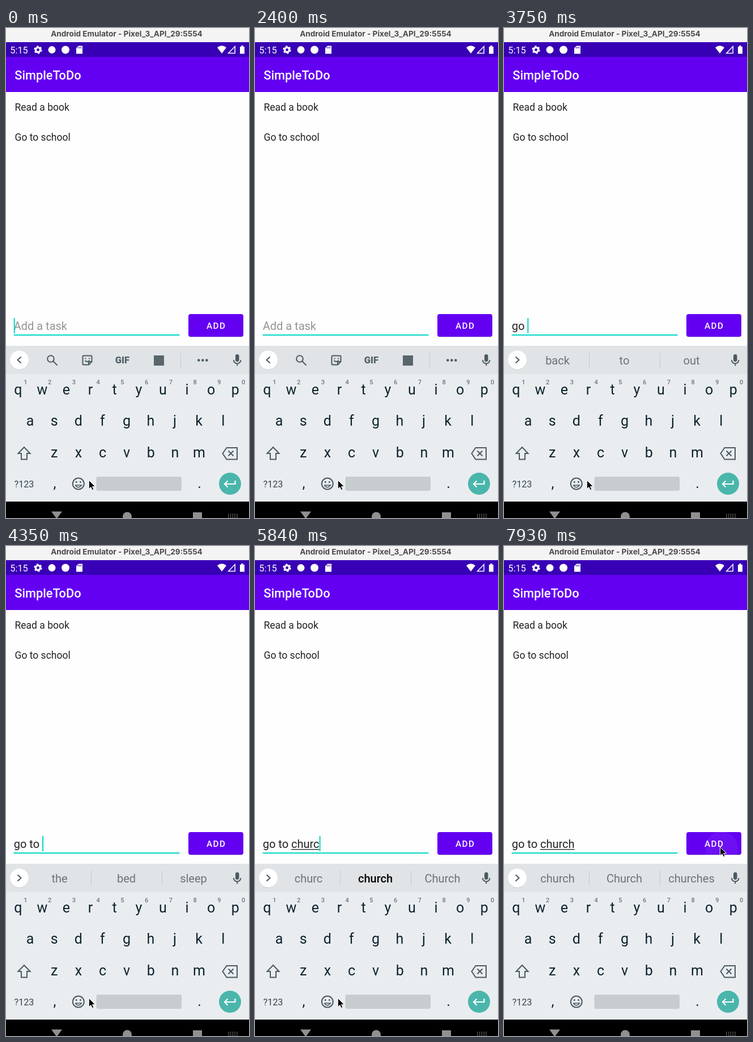
Animation, 429 px wide and 865 px high, one loop 8000 ms. Source, as an HTML page:

```html
<!DOCTYPE html>
<html lang="en">
<head>
<meta charset="utf-8">
<title>SimpleToDo</title>
<style>
  html, body { margin: 0; width: 100%; height: 100%; overflow: hidden; background: #fefefe; }
  svg { display: block; width: 429px; height: 865px; font-family: Roboto, sans-serif; }
  text { white-space: pre; }
  .mid { text-anchor: middle; }
  .line { fill: none; stroke: #4b5a61; stroke-width: 2; }
  .key { font-size: 25px; fill: #0c232c; text-anchor: middle; }
  .digit { font-size: 11px; font-weight: 500; fill: #6d767b; text-anchor: middle; }
  .hint { font-size: 20px; fill: #6b7378; text-anchor: middle; }
  .hint.best { fill: #000; font-weight: 500; }
  .field { font-size: 20px; }
</style>
</head>
<body>
<svg viewBox="0 0 429 865">
  <rect width="429" height="25" fill="#f5f4f5"/>
  <text class="mid" x="213" y="15.300" font-family="Inter, sans-serif" font-size="13.600" font-weight="700" fill="#4b4a4b">Android Emulator - Pixel_3_API_29:5554</text>

  <rect y="25" width="429" height="27" fill="#3800b5"/>
  <rect y="51" width="429" height="62" fill="#6300f2"/>
  <g fill="#fff">
    <text x="7.300" y="44.500" font-size="16.300">5:15</text>
    <circle cx="56.500" cy="38.500" r="4.100" fill="none" stroke="#fff" stroke-width="3.400"/>
    <circle cx="56.500" cy="38.500" r="6.200" fill="none" stroke="#fff" stroke-width="2" stroke-dasharray="3.250"/>
    <circle cx="81" cy="38.500" r="6.500"/>
    <circle cx="105" cy="38.500" r="7"/>
    <path d="M128 31.500h7v14h-11v-10z"/>
    <path d="M127.500 36v-2.500M130 36v-2.500M132.500 36v-2.500" stroke="#3800b5" stroke-width="1.200"/>
    <path d="M373 34.500q8-6.500 16 0l-8 10.500z"/>
    <path d="M404.200 32.500v12h-11.500z" fill="none" stroke="#fff" stroke-width="1.500"/>
    <path d="M413 33h2.300v-2h3.400v2h2.300v12.500h-8z"/>
    <text x="15.300" y="91" font-size="21.800" font-weight="500">SimpleToDo</text>
  </g>

  <g font-size="17.500" fill="#222">
    <text x="15.500" y="146">Read a book</text>
    <text x="15.500" y="199">Go to school</text>
  </g>

  <text class="field" id="prompt" x="13.700" y="533" fill="#949494">Add a task</text>
  <text class="field" id="typed" x="13.700" y="533" fill="#222"></text>
  <rect id="under" y="535" height="1.300" fill="#222"/>
  <rect x="13.500" y="541" width="293" height="2" fill="#03d6c8"/>
  <rect id="caret" y="512" width="2" height="27" fill="#03d6c8"/>

  <clipPath id="edge"><rect x="322" y="505" width="97" height="40" rx="4"/></clipPath>
  <rect x="322" y="506" width="97" height="40" rx="4" fill="#000" opacity=".15"/>
  <rect x="322" y="505" width="97" height="40" rx="4" fill="#6300f2"/>
  <circle id="ripple" cx="384" cy="533" r="29" fill="#fff" opacity=".06" clip-path="url(#edge)"/>
  <text class="mid" x="371.200" y="531" font-size="15.300" font-weight="500" letter-spacing="1.370" fill="#fff">ADD</text>

  <rect y="561" width="429" height="50" fill="#e0e4e7"/>
  <rect y="611" width="429" height="225" fill="#eaedf0"/>
  <circle cx="23.500" cy="586.700" r="16.800" fill="#000" opacity=".08"/>
  <circle cx="23.500" cy="586" r="16.500" fill="#fff"/>
  <path id="chevron" class="line" d="M3-5.500L-3 0L3 5.500"/>
  <g id="tools">
    <circle class="line" cx="79" cy="584" r="5.800"/>
    <path class="line" d="M83 588l7.500 7.500"/>
    <path class="line" stroke-linejoin="round" d="M137 578.500h13a1.500 1.500 0 0 1 1.500 1.500v9l-5.500 5.500h-9a1.500 1.500 0 0 1-1.500-1.500v-13a1.500 1.500 0 0 1 1.500-1.500zM151.500 589h-5.500v5.500M139.500 587q4 4 8 0"/>
    <path d="M139.500 582.500h2v2h-2zM146 582.500h2v2h-2z" fill="#4b5a61"/>
    <text class="mid" x="205.500" y="592" font-size="16.500" font-weight="900" fill="#536168">GIF</text>
    <rect x="261" y="578" width="18" height="18" fill="#59666c"/>
    <path d="M308.500 574v25" stroke="#c5cace"/>
    <path d="M340.300 586.500h0M347.300 586.500h0M354.300 586.500h0" stroke="#4b5a61" stroke-width="4.600" stroke-linecap="round"/>
  </g>
  <g id="hints">
    <path d="M150.500 573v27M275.500 573v27" stroke="#c5cace"/>
    <text class="hint" x="94.500" y="594"></text>
    <text class="hint" x="212.500" y="594"></text>
    <text class="hint" x="331" y="594"></text>
  </g>
  <rect x="405" y="576" width="6.500" height="13" rx="3.250" fill="#4b5a61"/>
  <path class="line" d="M401.900 586a6.300 6.300 0 0 0 12.600 0M408.200 592.300v4"/>

  <g id="keys"></g>
  <path class="line" d="M32 740L21.500 751H27v10.500h10V751h5.500z"/>
  <path class="line" d="M382.500 751l7-10H408v20.500h-18.500zM392.500 746.500l9 9m0-9l-9 9"/>
  <text class="mid" x="32" y="810.500" font-size="16.200" fill="#36474f">?123</text>
  <circle class="line" cx="127.800" cy="804.500" r="10"/>
  <path d="M122.300 807h11q-5.500 7.500-11 0M124.200 801.500h0M131.400 801.500h0" fill="none" stroke="#4b5a61" stroke-width="1.600"/>
  <path d="M124.200 801.500h0M131.400 801.500h0" stroke="#4b5a61" stroke-width="3.200" stroke-linecap="round"/>
  <rect x="159.500" y="792" width="150.500" height="25" rx="3" fill="#c7cccf"/>
  <circle cx="395.500" cy="804.500" r="19.500" fill="#4ab6ab"/>
  <path d="M404.500 799v6H387M391.500 799.500l-5.500 5.500l5.500 5.500" fill="none" stroke="#fff" stroke-width="2.200"/>

  <rect y="836" width="429" height="29"/>
  <g fill="#909090">
    <path d="M80 853.500h19l-9.500 13z"/>
    <circle cx="214" cy="862.500" r="8"/>
    <rect x="330" y="855" width="16" height="10"/>
    <path d="M392 858.500h17M392 861.500h17M392 864.500h17" stroke="#909090" stroke-width="1.500" stroke-dasharray="1.500 2.300"/>
  </g>
  <path id="mouse" d="M0 0V15.500l3.600-3.400 2.300 5.300 2.600-1.100-2.300-5.200h5z" stroke="#fff"/>
</svg>
<script>
const $ = id => document.getElementById(id);
const LOOP = 8000, LEFT = 13.7;

const keys = [];
const addKey = (cls, x, y, label) => keys.push(`<text class="${cls}" x="${x}" y="${y}">${label}</text>`);
[["qwertyuiop", 21.3, 647], ["asdfghjkl", 42.5, 702], ["zxcvbnm", 85.3, 758]].forEach(([row, x, y]) =>
  [...row].forEach((c, i) => addKey("key", x + 42.6 * i, y, c)));
[..."1234567890"].forEach((c, i) => addKey("digit", 34.5 + 42.75 * i, 629, c));
addKey("key", 86, 812, ",");
addKey("key", 341.5, 812, ".");
$("keys").innerHTML = keys.join("");

// start time, typed text, suggestions (* marks the bold one)
const typing = [
  [0, "", ""],
  [3150, "g", ""],
  [3300, "g", "g go great"],
  [3450, "go", "go got good"],
  [3750, "go ", "back to out"],
  [3900, "go t", "t *to the"],
  [4050, "go to", "to too tomorrow"],
  [4350, "go to ", "the bed sleep"],
  [5100, "go to c", "c *church Cavlor"],
  [5250, "go to ch", "ch *church change"],
  [5390, "go to chu", "chu *church chuck"],
  [5690, "go to chur", "chur *church Church"],
  [5840, "go to churc", "churc *church Church"],
  [6140, "go to church", "church Church churches"]
];
const blinks = [300, 900, 1350, 1800, 2400, 2850, 4950, 5100, 6590, 7040, 7490];
const moves = [6890, 7040, 7190, 7340, 7490, 7630, 7780];

const show = (id, on) => $(id).setAttribute("visibility", on ? "visible" : "hidden");
const passed = (times, t) => times.filter(s => s <= t).length;
const labels = document.querySelectorAll(".hint");
const typed = $("typed");

function mouseAt(t) {
  const n = passed(moves, t);
  if (!n) return [146.3, 798.3];
  const p = (n - 1) / (moves.length - 1), e = p * p * (3 - 2 * p);
  return [203.5 + 178 * e, 775.3 - 244 * e];
}

function draw(t) {
  const [, text, hints] = typing.filter(s => s[0] <= t).pop();
  typed.textContent = text;
  const width = n => n ? typed.getSubStringLength(0, n) : 0;
  const start = LEFT + width(text.lastIndexOf(" ") + 1), end = LEFT + width(text.length);
  $("under").setAttribute("x", start);
  $("under").setAttribute("width", end - start);
  $("caret").setAttribute("x", end);
  show("caret", passed(blinks, t) % 2 === 0);
  show("prompt", !text);

  show("tools", !hints);
  show("hints", hints);
  $("chevron").setAttribute("transform", `translate(23.5 586) scale(${hints ? -1 : 1} 1)`);
  hints.split(" ").forEach((word, i) => {
    labels[i].textContent = word.replace("*", "");
    labels[i].classList.toggle("best", word[0] === "*");
  });

  show("ripple", t >= 7930);
  $("mouse").setAttribute("transform", `translate(${mouseAt(t)})`);
}

function tick(now) {
  draw(now % LOOP);
  requestAnimationFrame(tick);
}
draw(0);
requestAnimationFrame(tick);
</script>
</body>
</html>
```
